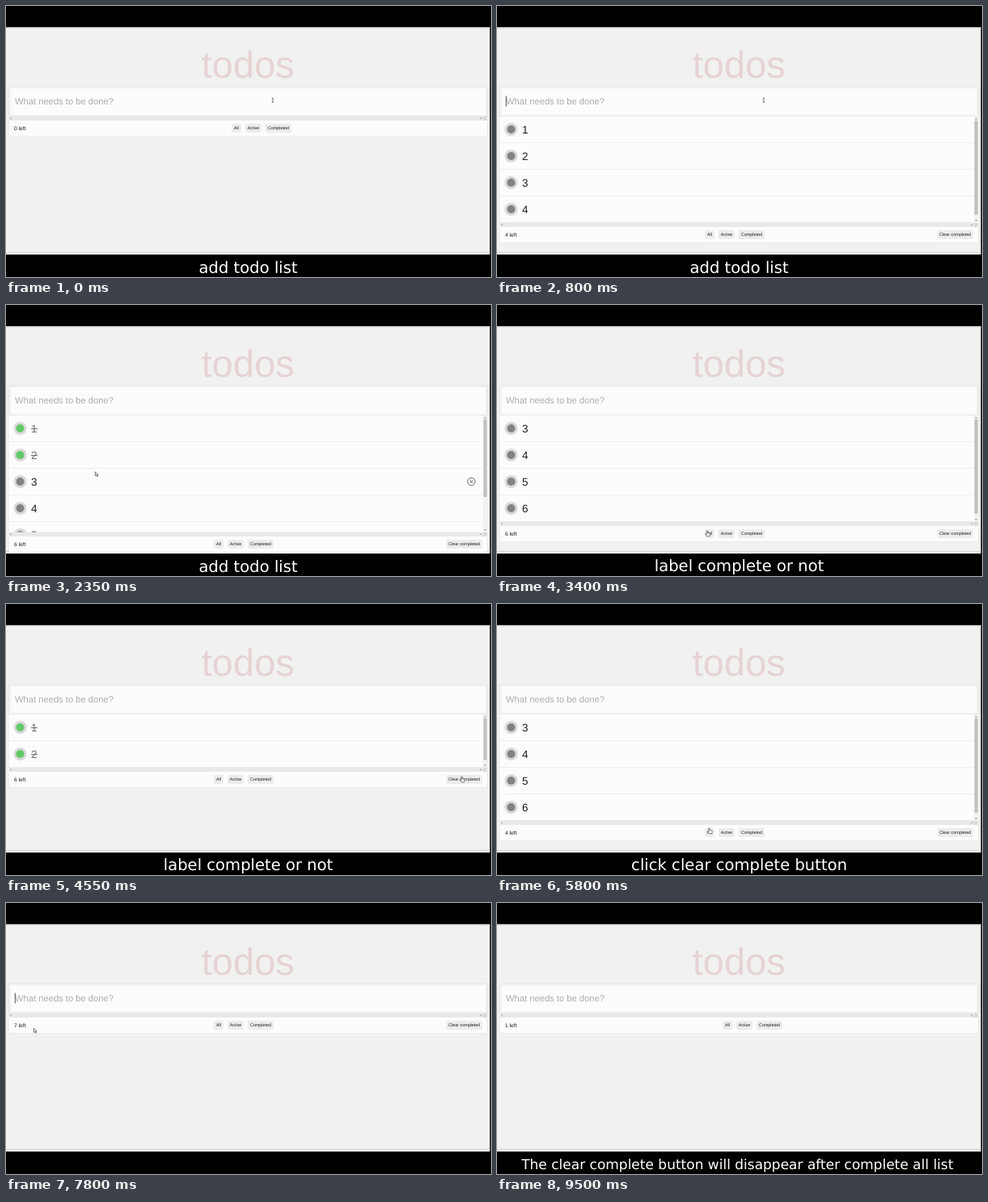
Animation, 600 px wide and 336 px high, one loop 9800 ms. Source, as an HTML page:

```html
<!DOCTYPE html>
<html lang="en">
<head>
<meta charset="utf-8">
<title>Todo list demo</title>
<style>
html, body { margin: 0; width: 100%; height: 100%; overflow: hidden; background: #000; }
svg { display: block; width: 600px; height: 336px; }
text { font-family: "Liberation Sans", Arial, sans-serif; white-space: pre; text-rendering: geometricPrecision; }
.caption { font-family: "DejaVu Sans", Verdana, sans-serif; fill: #fff; text-anchor: middle; }
.btn { font-size: 5.35px; text-anchor: middle; fill: #1a1a1a; }
</style>
</head>
<body>
<svg viewBox="0 0 600 336">
  <defs>
    <clipPath id="view"><rect id="viewRect" x="4" y="137" width="586" height="0"/></clipPath>
    <filter id="soft" x="-5%" y="-20%" width="110%" height="140%"><feGaussianBlur stdDeviation="1.2"/></filter>
  </defs>
  <rect width="600" height="336"/>
  <rect y="26.5" width="598.6" height="281.7" fill="#f1f1f1"/>
  <rect y="26.5" width="598.6" height="1.5" fill="#e2e2e2"/>
  <rect y="305" width="598.6" height="1" fill="#dcd6d3"/>
  <text x="299.3" y="89" font-size="47" text-anchor="middle" fill="#e6d3d4">todos</text>
  <rect x="3.5" y="100" width="592" height="37" fill="#e4e4e4" filter="url(#soft)"/>
  <rect x="4.5" y="101" width="590" height="35" fill="#f7f7f7"/>
  <rect x="6.5" y="103" width="586" height="31" fill="#fcfcfc"/>
  <g id="app"></g>
</svg>
<script>
const LOOP = 9800, STEP = 50, ROW = 33, TOP = 137, MAX_H = 145;
const CLICK = 100, TRAVEL = 250;

// Pointer stops: arrival time, a point or a button name, then a click action.
const stops = [
  [0, [330, 117]],
  [1400, [210.5, 195]],
  [1850, [17, 152], 'check', '1'],
  [2050, [17, 185], 'check', '2'],
  [2350, [110, 206.5]],
  [2800, 'Active', 'filter', 'Active'],
  [3400, 'All', 'filter', 'All'],
  [4050, 'Completed', 'filter', 'Completed'],
  [4550, 'Clear completed', 'clear'],
  [4900, [338, 182]],
  [5150, [287, 156]],
  [5300, 'All', 'filter', 'All'],
  [5800, [262.5, 278]],
  [6150, 'Active'],
  [6300, 'Completed', 'filter', 'Completed'],
  [6700, [210, 117]],
  [7800, [34, 155]],
  [7950, 'All', 'filter', 'All'],
  [8250, [575, 151]],
  [9050, [511, 131]],
  [9200, [543, 174]]
];

const events = stops.filter(s => s[2]).map(([at, , name, v]) => [at + CLICK, name, v]);
for (let i = 0; i < 9; i++) {
  const at = i < 6 ? 200 + i * 160 : 6900 + (i - 6) * 180;
  events.push([at, 'type', String(i + 1)], [at + 80, 'add', String(i + 1)]);
}
for (let i = 0; i < 7; i++) events.push([8300 + i * 90, 'remove']);
events.sort((a, b) => a[0] - b[0]);

// [start, text, centre, baseline]
const captions = [
  [0, 'add todo list', 299.6, 331],
  [2600, 'label complete or not', 299.6, 330],
  [4650, 'click clear complete button', 299.6, 330],
  [7400, '', 0, 0],
  [8100, 'The clear complete button will disappear after complete all list', 297.4, 329.5]
];

function ramp(t, a, b) {
  const p = Math.min(1, Math.max(0, (t - a) / (b - a)));
  return p * p * (3 - 2 * p);
}

function stateAt(t) {
  const s = { items: [], left: 0, filter: 'All', typed: '' };
  const act = {
    type: v => { s.typed = v; },
    add: v => { s.items.push({ label: v, done: false }); s.left = s.items.length; s.typed = ''; },
    check: v => { s.items.find(i => i.label === v).done = true; },
    filter: v => { s.filter = v; },
    clear: () => { s.items = s.items.filter(i => !i.done); s.left = s.items.length; },
    remove: () => { s.left = s.items.length; s.items.shift(); }
  };
  for (const [at, name, v] of events) if (at <= t) act[name](v);
  s.list = s.items.filter(i => s.filter === 'All' || i.done === (s.filter === 'Completed'));
  s.h = Math.min(s.list.length * ROW, MAX_H);
  s.cy = TOP + s.h + 14.5;
  s.buttons = buttons(s.cy, s.items.length > 0);
  return s;
}

function buttons(cy, hasClear) {
  const dx = hasClear ? 0 : 22;
  const list = [['All', 257 + dx, 12], ['Active', 274 + dx, 20], ['Completed', 299 + dx, 32]];
  if (hasClear) list.push(['Clear completed', 544.5, 44.5]);
  return list.map(([label, x, w]) => ({ label, x, w, y: cy - 5.5, h: 11 }));
}

const path = stops.map(([at, place]) => {
  if (Array.isArray(place)) return [at, ...place];
  const b = stateAt(at).buttons.find(b => b.label === place);
  return [at, b.x + b.w / 2 - 3, b.y + 2];
});

function pointerAt(t) {
  let [, x, y] = path[0];
  for (let i = 1; i < path.length; i++) {
    const [at, px, py] = path[i];
    const p = ramp(t, Math.max(path[i - 1][0] + CLICK, at - TRAVEL), at);
    x += (px - x) * p;
    y += (py - y) * p;
  }
  return [x, y];
}

const rect = (x, y, w, h, fill, extra = '') =>
  `<rect x="${x}" y="${y}" width="${w}" height="${h}" fill="${fill}" ${extra}/>`;
const text = (x, y, size, fill, str) =>
  `<text x="${x}" y="${y}" font-size="${size}" fill="${fill}">${str}</text>`;
const disc = (x, y, r, fill, extra = '') =>
  `<circle cx="${x}" cy="${y}" r="${r}" fill="${fill}" ${extra}/>`;
const shape = (d, fill, extra = '') => `<path d="${d}" fill="${fill}" ${extra}/>`;

function row(item, y, hover) {
  const c = y + 16, ink = item.done ? '#707070' : '#1c1c1c';
  let out = rect(4, y, 586, ROW, '#fcfcfc') + rect(4, y + ROW - 1, 586, 1, '#eeeeee');
  out += disc(17.5, c, 8, '#d9d9d9') + disc(17.5, c, 5, item.done ? '#63c968' : '#828282');
  out += text(31, c + 4.8, 13.5, ink, item.label);
  if (item.done) out += rect(31, c, 8, 1, ink);
  if (hover) {
    const line = 'stroke="#4a4a4a" stroke-width=".8"';
    out += disc(575.7, c, 4.7, 'none', line);
    out += shape(`M573.7 ${c - 2}l4 4m0 -4l-4 4`, 'none', line);
  }
  return out;
}

function scrollbars(h, rows, pos) {
  const b = TOP + h;
  let out = rect(4, b - 0.5, 586, 5.5, '#e9e9e9') + rect(590, b - 0.5, 5, 5.5, '#dadada');
  out += shape(`M4.7 ${b + 2.2}l1.8 -1.3v2.6z`, '#999');
  out += shape(`M588.5 ${b + 2.2}l-1.8 -1.3v2.6z`, '#999');
  if (h) {
    const track = h - 10, total = rows * ROW + 6;
    out += rect(590, TOP, 5, h, '#f2f2f2');
    out += rect(590.8, TOP + 5 + track * pos / total, 4, track * h / total, '#c0c0c0');
    out += shape(`M591.2 ${TOP + 3.5}h3l-1.5 -1.8z`, '#888');
    out += shape(`M591.2 ${b - 3.8}h3l-1.5 1.8z`, '#888');
  }
  return out;
}

const inside = (x, y, b) => x >= b.x && x <= b.x + b.w && y >= b.y - 1 && y <= b.y + b.h;

function pointer(x, y, kind) {
  const d = {
    beam: 'M-1.2 -2.7h2.4M0 -2.7v5M-1.2 2.3h2.4',
    hand: 'M-.6 .2q.7 -.8 1.3 0v2.4l2.6 .6q.7 .3 .5 1.2l-.6 2.4h-3.4l-2 -2.4q-.2 -.8 .6 -.6l1 .7z',
    arrow: 'M.4 .3v5l1.2 -1l.9 2l.9 -.4l-.9 -1.9h1.6z'
  }[kind];
  const line = 'stroke="#444" stroke-width=".7" stroke-linejoin="round"';
  return `<g transform="translate(${x} ${y})">${shape(d, kind === 'beam' ? 'none' : '#fff', line)}</g>`;
}

const app = document.getElementById('app');
const viewRect = document.getElementById('viewRect');

function draw(t) {
  const s = stateAt(t), { list, h, cy } = s;
  const pos = 59 * (ramp(t, 1250, 1400) - ramp(t, 1650, 1800));
  const [mx, my] = pointerAt(t);
  viewRect.setAttribute('height', h);

  let out = s.typed ? text(11, 122, 11.2, '#333', s.typed)
                    : text(11, 122, 11.2, '#acacac', 'What needs to be done?');
  const focused = t >= 50 && t < 1250 || t >= 6700 && t < 7950;
  if (focused) out += rect(s.typed ? 17.5 : 10.8, 111.5, 0.9, 13, '#444');

  const inList = my >= TOP && my < TOP + h;
  const hover = inList ? Math.floor((my - TOP + pos) / ROW) : -1;
  out += '<g clip-path="url(#view)">' +
    list.map((item, i) => row(item, TOP + i * ROW - pos, i === hover)).join('') + '</g>';
  out += scrollbars(h, list.length, pos);

  out += rect(3.5, cy - 9.5, 592, 19.5, '#e8e8e8') + rect(4, cy - 9.5, 591, 19, '#fcfcfc');
  out += text(10, cy + 2.3, 6.6, '#1a1a1a', s.left + ' left');
  for (const b of s.buttons) {
    out += rect(b.x, b.y, b.w, b.h, '#ececec', 'rx="2"');
    out += `<text class="btn" x="${b.x + b.w / 2}" y="${cy + 1.9}">${b.label}</text>`;
  }

  if (t < 9500) {
    const onButton = s.buttons.some(b => inside(mx, my, b));
    const onRow = inList && (Math.abs(mx - 17.5) < 8 || Math.abs(mx - 575.7) < 5);
    const kind = my > 101 && my < 136 ? 'beam' : onButton || onRow ? 'hand' : 'arrow';
    out += pointer(mx, my, kind);
  }

  const [, words, x, y] = captions.filter(c => c[0] <= t).pop();
  const size = Math.min(19.6, 1088 / words.length);
  if (words) out += `<text class="caption" x="${x}" y="${y}" font-size="${size}">${words}</text>`;
  app.innerHTML = out;
}

const start = performance.now();
let last = -1;
function tick() {
  const t = Math.floor(((performance.now() - start) % LOOP) / STEP) * STEP;
  if (t !== last) draw(last = t);
  requestAnimationFrame(tick);
}
tick();
</script>
</body>
</html>
```
